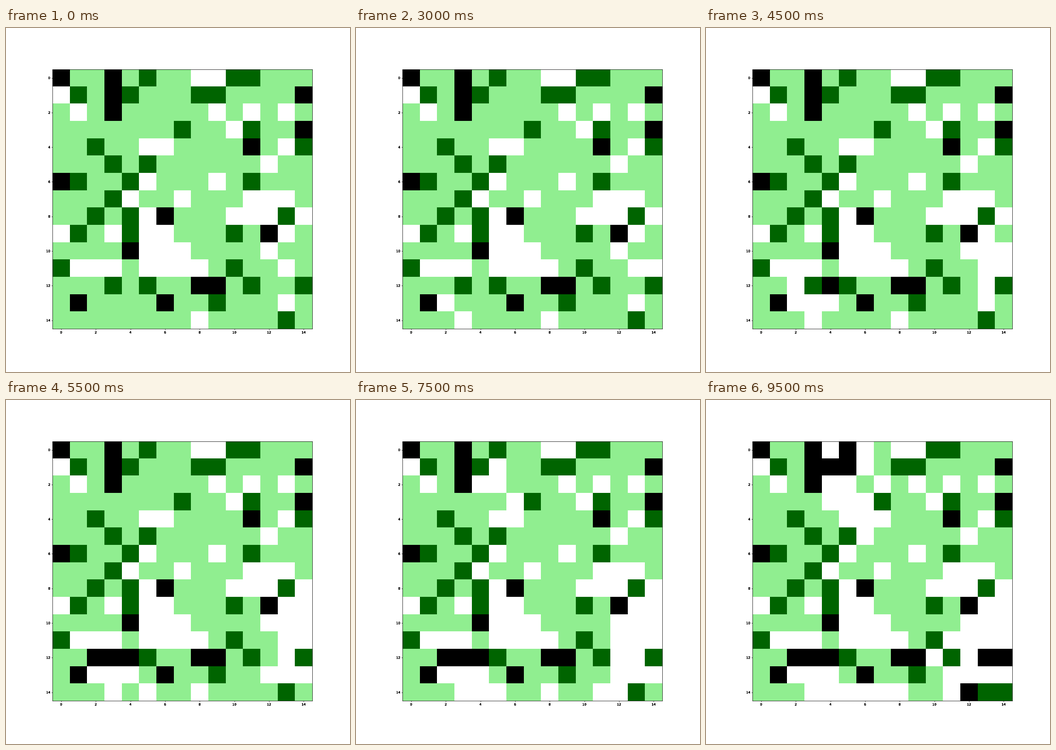
These frames come from a looping animation (748 px wide and 748 px high, 10000 ms). A matplotlib script:

```python
import matplotlib.pyplot as plt
import numpy as np
from matplotlib.animation import FuncAnimation
from matplotlib.colors import ListedColormap
from matplotlib.patheffects import Normal

SIZE, DPI = 748, 88
STEP_MS, STEPS = 500, 20
CODES = "W.GK"
CMAP = ListedColormap(["white", "lightgreen", "darkgreen", "black"])

START = """
K..K.G..WWGG...
WG.KG...GG....K
.W.K.....W.W.W.
.......G..WG..K
..G..WW....K.WG
...G.G......W..
KG..GW...W.G...
...GW..W...WWW.
..G.GWK...WWWGW
WG.WGWW...G.KW.
....KWWW....W..
GWWW.WWWW.G..W.
...G.G..KK.G..G
.K....K..G...W.
........W....G.
""".split()

# step: cells that change, written as state + row,column
CHANGES = {
    4: "W11,14",
    5: "W13,2",
    6: "W14,3",
    7: "W13,3 W12,4 W12,13",
    8: "W10,13",
    9: "W12,2 W13,4 W10,14 K12,4",
    10: "K12,2 W9,14 W14,5",
    11: "K12,3 W13,12 W13,14",
    12: "W2,5 W11,12 W12,12 W14,11",
    13: "W14,12",
    15: "W1,5 W2,4 W3,6 W14,4",
    16: "W0,4 K1,5 W4,7 W13,11 G14,14",
    17: "W2,7 W14,6 W14,7 K14,12",
    18: "W0,6 K1,4 W3,4 W5,6 W11,11 K12,13",
    19: "K0,5 W1,6 W3,5 W12,10 K12,14",
}


def px(n):
    """Pixels to points."""
    return n * 72 / DPI


def grid_at(step):
    grid = np.array([[CODES.index(c) for c in row] for row in START])
    for when, cells in CHANGES.items():
        if when <= step:
            for cell in cells.split():
                row, col = map(int, cell[1:].split(","))
                grid[row, col] = CODES.index(cell[0])
    return grid


fig = plt.figure(figsize=(SIZE / DPI, SIZE / DPI), dpi=DPI, facecolor="white")
left, right, top, bottom = 101, 666, 89.7, 654.4
ax = fig.add_axes([left / SIZE, 1 - bottom / SIZE,
                   (right - left) / SIZE, (bottom - top) / SIZE])
image = ax.imshow(grid_at(0), cmap=CMAP, vmin=-0.5, vmax=3.5,
                  interpolation="nearest", aspect="auto")

ticks = range(0, 15, 2)
ax.set_xticks(ticks)
ax.set_yticks(ticks)
ax.tick_params(length=px(2.4), width=px(0.8), pad=px(2.4),
               labelsize=px(6.93), labelfontfamily="DejaVu Sans")
for spine in ax.spines.values():
    spine.set_linewidth(px(0.8))
# Repeated passes darken the small digits
for label in ax.get_xticklabels() + ax.get_yticklabels():
    label.set_path_effects([Normal()] * 4)


def update(step):
    image.set_data(grid_at(step))
    return [image]


anim = FuncAnimation(fig, update, frames=STEPS, interval=STEP_MS,
                     repeat=True, repeat_delay=0, blit=False)
plt.show()
```
